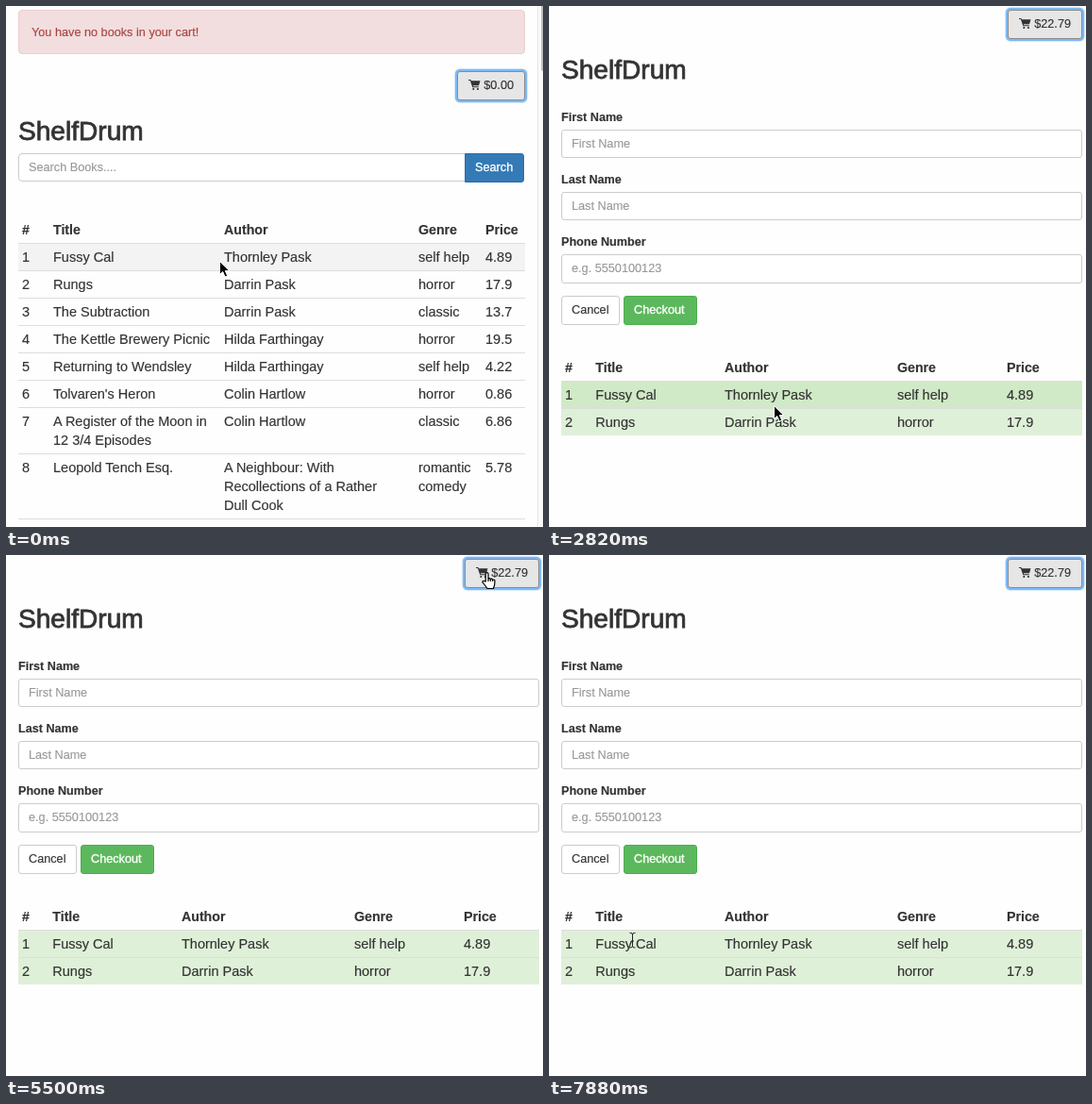
These frames come from a looping animation (569 by 552 pixels, 8 s). An HTML page:

```html
<!DOCTYPE html>
<html lang="en">
<head>
<meta charset="utf-8">
<title>Book shop cart</title>
<style>
  html, body { margin: 0; width: 100%; height: 100%; overflow: hidden; background: #fefefe; }
  body { position: relative; color: #333; font: 12.7px/20px "Liberation Sans", Arial, sans-serif; -webkit-text-stroke: .15px; }
  * { box-sizing: border-box; }
  .abs, .view, .box, .cursor { position: absolute; white-space: pre; }
  .view { inset: 0; }
  .box { border: 1px solid #ccc; border-radius: 3px; height: 31px; line-height: 29px; padding: 0 10px; background: #fff; }
  .field { left: 13px; width: 552px; height: 30px; line-height: 28px; color: #999; }
  .label { left: 13px; font-weight: bold; font-size: 12.6px; }
  h1 { position: absolute; left: 13px; top: 48px; margin: 0; font: 28.1px/40px "Liberation Sans", Arial, sans-serif; -webkit-text-stroke: .8px; }
  .alert { left: 13px; top: 4px; width: 537px; height: 47px; line-height: 46px; padding-left: 13px;
    background: #f2dede; border: 1px solid #ebccd1; border-radius: 4px; color: #a94442; }
  .search { left: 13px; top: 91px; width: 474px; height: 30px; color: #999; border-radius: 4px 0 0 4px; }
  .go { left: 486px; top: 91px; width: 63px; color: #fff; background: #337ab7; border-color: #2e6da4; border-radius: 0 3px 3px 0; }
  .go, .done { -webkit-text-stroke: .35px; }
  .done { left: 79px; top: 307px; width: 78px; color: #fff; background: #5cb85c; border-color: #4cae4c; }
  .cart { top: 4px; padding: 0 11px; display: flex; align-items: center; gap: 3px; }
  .cart svg { fill: #333; margin-top: -2px; }
  #shop .cart { right: 19px; }
  #checkout .cart { right: 4px; }
  .cart.hot { background: #e6e6e6; border-color: #adadad; }
  .box.focus { background: #e6e6e6; border-color: #8c8c8c; box-shadow: 0 0 0 2px #7db9f6, 0 0 1px 2.5px #a9d1fa; }
  .table { position: absolute; left: 13px; font-size: 14.5px; }
  #shop .table { top: 158px; width: 537px; --cols: 33px 181px 206px 71px 42px; }
  #checkout .table { top: 369px; width: 552px; --cols: 32.3px 136.7px 183px 116px 70px; }
  .row { display: grid; grid-template-columns: var(--cols); padding: 4px; border-top: 1px solid #ddd; white-space: pre; }
  .row.head { border: 0; font-weight: bold; font-size: 14.2px; }
  .row.hover { background: #f3f3f3; }
  .row.picked { background: #dff0d8; }
  .row.picked.hover { background: #d0e9c6; }
  .track { position: absolute; right: 0; top: 0; width: 6px; height: 100%; background: #fafafa; border-left: 1px solid #e7e7e7; }
  .thumb { position: absolute; right: 0; top: 0; width: 2px; height: 69px; background: #c1c1c1; border-radius: 0 0 0 2px; }
  .cursor { left: 0; top: 0; overflow: visible; }
  [hidden] { display: none !important; }
</style>
</head>
<body>
<div class="view" id="shop">
  <div class="abs alert" id="alert">You have no books in your cart!</div>
  <div class="view" id="page">
    <div class="box cart"></div>
    <h1>ShelfDrum</h1>
    <div class="box search">Search Books....</div>
    <div class="box go">Search</div>
    <div class="table"></div>
  </div>
  <div class="track"><div class="thumb"></div></div>
</div>
<div class="view" id="checkout">
  <div class="box cart"></div>
  <h1>ShelfDrum</h1>
  <div class="abs label" style="top:108px">First Name</div>
  <div class="box field" style="top:131px">First Name</div>
  <div class="abs label" style="top:174px">Last Name</div>
  <div class="box field" style="top:197px">Last Name</div>
  <div class="abs label" style="top:240px">Phone Number</div>
  <div class="box field" style="top:263px;height:31px">e.g. 5550100123</div>
  <div class="box" id="cancel" style="left:13px;top:307px;width:62px">Cancel</div>
  <div class="box done">Checkout</div>
  <div class="table"></div>
</div>
<svg class="cursor" id="arrow" width="12" height="18"><path d="M.5 .5v14l3.2-3 2.4 5.5 2.6-1.1-2.4-5.3h4.4z" stroke="#fff"/></svg>
<svg class="cursor" id="hand" width="16" height="19"><path d="M4.2 10V2a1.4 1.4 0 0 1 2.8 0v5l1.3-.4 1 .8 1.4-.3.9.9q2.4-.2 2.4 1.8l-.4 4-1.1 3.7H6L3.4 14 .8 10.6q.6-1.8 2.2-.9zM7 7v3M9.3 7.8V10M11.6 8.4V10" fill="#fff" stroke="#000" stroke-width="1.2"/></svg>
<svg class="cursor" id="beam" width="8" height="17"><path d="M.5 .5h1.3q1.7 0 1.7 1.7v12q0 1.7-1.7 1.7H.5M6.5 .5H5.2q-1.7 0-1.7 1.7v12q0 1.7 1.7 1.7h1.3M2 9h3" fill="none" stroke="#222"/></svg>
<script>
const $ = (selector, root = document) => root.querySelector(selector);
const $$ = (selector, root = document) => [...root.querySelectorAll(selector)];

const books = [
  ['Fussy Cal', 'Thornley Pask', 'self help', '4.89'],
  ['Rungs', 'Darrin Pask', 'horror', '17.9'],
  ['The Subtraction', 'Darrin Pask', 'classic', '13.7'],
  ['The Kettle Brewery Picnic', 'Hilda Farthingay', 'horror', '19.5'],
  ['Returning to Wendsley', 'Hilda Farthingay', 'self help', '4.22'],
  ["Tolvaren's Heron", 'Colin Hartlow', 'horror', '0.86'],
  ['A Register of the Moon in\n12 3/4 Episodes', 'Colin Hartlow', 'classic', '6.86'],
  ['Leopold Tench Esq.', 'A Neighbour: With\nRecollections of a Rather\nDull Cook', 'romantic\ncomedy', '5.78'],
  ['Tarvel', 'Gideon Prewett', 'self help', '17.6'],
  ['Rosabel Corvin', 'Gus Fennholm', 'historical', '4.27'],
  ['The Misfortunes of Ellie', 'Rolf Tanley', 'horror', '7.01']
];
const totals = ['$0.00', '$4.89', '$22.79'];
const cartIcon = `<svg width="13" height="13"><path d="M0 1h2.4l.5 1.3h9.6l-1.5 4.9H4.9l.3 1h5.6v1H4.3L1.8 2H0z"/><circle cx="5.3" cy="11" r="1.1"/><circle cx="9.9" cy="11" r="1.1"/></svg>`;

function fillTable(table, list) {
  const rowHtml = (cells, cls) => `<div class="row ${cls}">${cells.map(c => `<span>${c}</span>`).join('')}</div>`;
  table.innerHTML = rowHtml(['#', 'Title', 'Author', 'Genre', 'Price'], 'head') +
    list.map((book, i) => rowHtml([i + 1, ...book], 'book')).join('');
}
fillTable($('#shop .table'), books);
fillTable($('#checkout .table'), books.slice(0, 2));

// Each step: start time, pointer, its position, and what changes on the page.
const shop = { view: 'shop' }, checkout = { view: 'checkout', cart: 'focus', hover: 0 };
const steps = [
  [0, 'arrow', 226, 270, { ...shop, picked: 0, cart: 'focus', hover: 1, cancel: '' }],
  [140, 'arrow', 226, 270, { picked: 1, cart: '' }],
  [290, 'arrow', 226, 270, { hover: 3 }],
  [590, 'arrow', 229, 262],
  [740, 'beam', 230, 239],
  [880, 'beam', 231, 223, { hover: 2 }],
  [1030, 'beam', 231, 223, { picked: 2 }],
  [1180, 'arrow', 290, 196, { hover: 1 }],
  [1330, 'arrow', 430, 110, { hover: 0 }],
  [1480, 'arrow', 546, 48],
  [1630, 'hand', 532, 21, { cart: 'hot' }],
  [1930, 'hand', 532, 21, checkout],
  [2530, 'arrow', 480, 120],
  [2680, 'arrow', 330, 330],
  [2820, 'arrow', 238, 423, { hover: 1 }],
  [2970, 'arrow', 190, 420],
  [3120, 'arrow', 122, 384, { hover: 0 }],
  [3270, 'arrow', 70, 350],
  [3420, 'hand', 34, 318],
  [3560, 'hand', 18, 310],
  [3710, 'hand', 18, 310, { cancel: 'focus', cart: '' }],
  [3860, 'hand', 18, 310, { ...shop, cancel: '' }],
  [4010, 'arrow', 22, 310, { hover: 5 }],
  [4460, 'arrow', 333, 193, { hover: 3 }],
  [4610, 'arrow', 524, 194, { hover: 1 }],
  [4910, 'arrow', 523, 140, { hover: 0 }],
  [5060, 'arrow', 519, 78],
  [5210, 'hand', 509, 25, { cart: 'hot' }],
  [5350, 'hand', 504, 18],
  [5500, 'hand', 504, 18, checkout],
  [6540, 'hand', 504, 18, shop],
  [7290, 'hand', 504, 18, checkout],
  [7440, 'arrow', 420, 110],
  [7590, 'arrow', 260, 270],
  [7730, 'arrow', 130, 375],
  [7880, 'beam', 85, 400]
];
let page = {};
const states = steps.map(([time, pointer, x, y, change]) => {
  page = { ...page, ...change };
  return { ...page, time, pointer, x, y };
});

function render(s) {
  for (const id of ['shop', 'checkout']) {
    $('#' + id).hidden = s.view !== id;
    $$('.book', $('#' + id)).forEach((row, i) => {
      row.classList.toggle('picked', i < s.picked);
      row.classList.toggle('hover', i + 1 === s.hover);
    });
  }
  $('#alert').hidden = s.picked > 0;
  $('#page').style.top = s.picked ? '0' : '65px';
  $$('.cart').forEach(cart => {
    cart.className = 'box cart ' + s.cart;
    cart.innerHTML = cartIcon + `<span>${totals[s.picked]}</span>`;
  });
  $('#cancel').className = 'box ' + s.cancel;
  $$('.cursor').forEach(c => {
    c.style.display = c.id === s.pointer ? '' : 'none';
    c.style.transform = `translate(${s.x}px, ${s.y}px)`;
  });
}

const start = performance.now();
let shown;
function tick(now) {
  const time = Math.max(0, now - start) % 8000;
  const state = states.findLast(s => s.time <= time);
  if (state !== shown) render(shown = state);
  requestAnimationFrame(tick);
}
tick(start);
</script>
</body>
</html>
```
